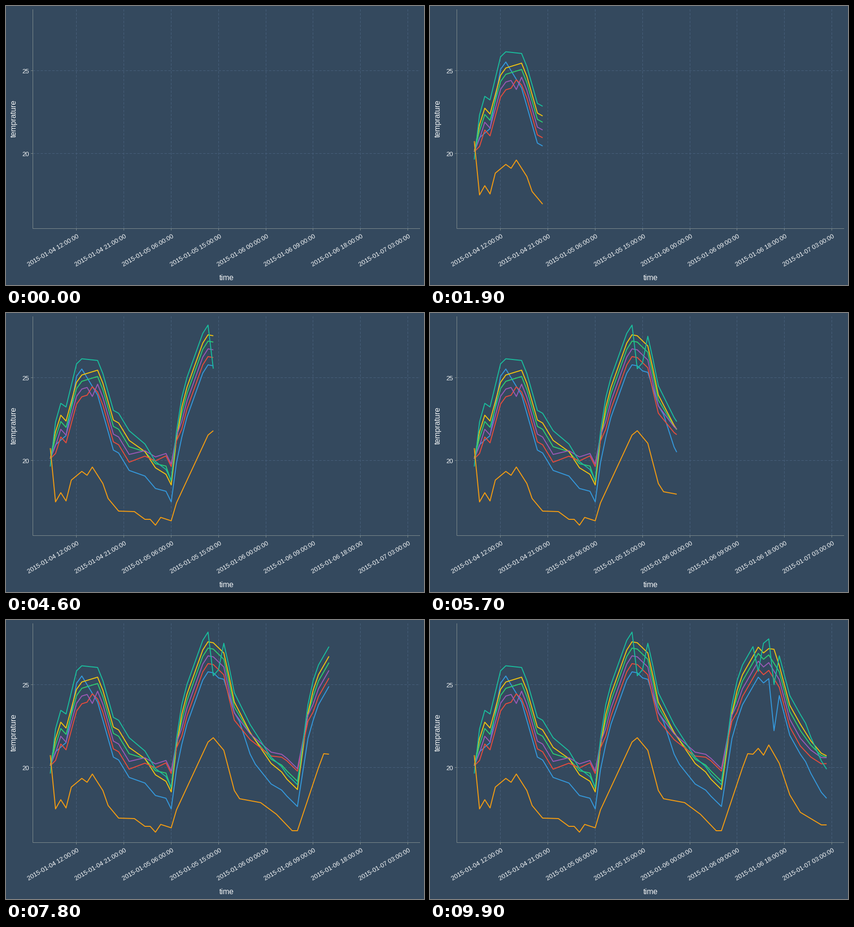
These frames come from a looping animation (864x576 px, 10 s). A matplotlib script:

```python
import numpy as np
import matplotlib.pyplot as plt
from matplotlib.animation import FuncAnimation

W, H, DPI = 864, 576, 72
FRAMES, HOURS = 100, 68
BG, GRID, AXIS, TEXT = "#34495e", "#48607c", "#7f8c8d", "#f4f6f7"
LEFT, RIGHT, TOP, BOTTOM = 55.5, 856, 7, 459.5
X0, HOUR_W = 91.5, 10.87

plt.rcParams["font.family"] = "Liberation Sans"
fig = plt.figure(figsize=(W / DPI, H / DPI), dpi=DPI, facecolor=BG)
ax = fig.add_axes([0, 0, 1, 1])
ax.set_xlim(0, W)
ax.set_ylim(H, 0)
ax.axis("off")


def rule(xs, ys, color, **kw):
    ax.plot(xs, ys, color=color, lw=1, solid_capstyle="butt", snap=False, **kw)


def label(x, y, s, size=13, ha="right", angle=0):
    ax.text(x, y, s, fontsize=size, color=TEXT, ha=ha, va="baseline",
            rotation=angle, rotation_mode="anchor")


# Axes, grid and labels
dashed = dict(ls=(0, (5, 3)), dash_capstyle="butt")
for k in range(8):
    x = int(145.7 + 97.83 * k) + 0.5
    day, hour = divmod(12 + 9 * k, 24)
    rule([x, x], [BOTTOM, TOP], GRID, **dashed)
    rule([x, x], [BOTTOM, BOTTOM + 4], AXIS)
    label(x + 6.4, 477.5, f"2015-01-{4 + day:02d} {hour:02d}:00:00", angle=30)
for temp, y in ((25, 133.5), (20, 304.5)):
    rule([LEFT, RIGHT], [y, y], GRID, **dashed)
    rule([LEFT - 4, LEFT], [y, y], AXIS)
    label(47.5, y + 5.5, str(temp))
rule([LEFT, LEFT], [TOP, BOTTOM], AXIS)
rule([LEFT, RIGHT], [BOTTOM, BOTTOM], AXIS)
label(455.5, 566, "time", 16, "center")
label(20.5, 232.5, "temprature", 16, "center", 90)

hours = np.arange(HOURS)


def through(*points):
    """Hourly heights along straight runs between (hour, y) key points."""
    return np.interp(hours, *zip(*points))


# The three-day swing that six sensors share, and the cooler seventh
indoor = through(
    (0, 301), (2, 233), (3, 245), (5, 165), (6, 150), (9, 140), (10, 167),
    (12, 243), (13, 249), (15, 285), (18, 288), (20, 308), (22, 308),
    (23, 330), (24, 259), (26, 175), (29, 84), (30, 67), (31, 69), (33, 90),
    (35, 187), (38, 237), (42, 284), (44, 293), (47, 325), (49, 198),
    (51, 135), (54, 78), (55, 90), (56, 81), (58, 116), (60, 198), (62, 237),
    (64, 265), (66, 284), (67, 286))
outdoor = through(
    (0, 279), (1, 390), (2, 371), (3, 388), (4, 345), (6, 327), (7, 335),
    (8, 318), (10, 352), (11, 383), (13, 409), (16, 410), (18, 426),
    (19, 426), (20, 438), (21, 422), (23, 429), (24, 392), (30, 252),
    (31, 243), (33, 269), (35, 352), (36, 369), (40, 377), (43, 401),
    (46, 435), (47, 435), (51, 305), (52, 276), (53, 277), (54, 265),
    (55, 279), (56, 258), (58, 296), (60, 361), (62, 397), (66, 423),
    (67, 423))

# How far each night has run towards dawn
dawn = through((15, 0), (22, 1), (23, 1), (25, 0), (34, 0), (45, 1), (47, 1),
               (50, 0), (62, 0), (67, 0.35))
spread = np.minimum(hours, 1)


def sensor(by_day, by_dawn, *bumps):
    """Shared swing, shifted by day and at dawn, plus (hour, width, height) bumps."""
    ys = indoor + spread * (by_day + (by_dawn - by_day) * dawn)
    for hour, width, height in bumps:
        ys = ys + height * np.maximum(0, 1 - abs(hours - hour) / width)
    return ys


series = [
    (sensor(40, 60, (1, 1, -35), (5.5, 4, -85), (35.5, 3, -45), (57, 1, 90),
            (67, 4, 35)), "#3498db"),
    (sensor(-9, 8, (23, 1, 10)), "#2ecc71"),
    (sensor(-22, 25, (57, 1, -16)), "#f1c40f"),
    (sensor(23, -13, (8, 1, -14)), "#e74c3c"),
    (sensor(7, -18, (8, 1, 22)), "#9b59b6"),
    (sensor(-42, 15, (0, 1, 16), (5, 4, -18), (31, 1, 88), (32, 1, 65),
            (54, 1, 70), (57, 1, 77), (67, 4, 44)), "#1abc9c"),
    (outdoor, "#f39c12"),
]
lines = [ax.plot([], [], color=c, lw=2, solid_capstyle="butt",
                 solid_joinstyle="round", zorder=3)[0] for _, c in series]

# Every reading lands on a whole frame; the tip slides linearly between
arrival = np.round(hours * (FRAMES - 1) / (HOURS - 1))


def update(frame):
    tip = np.interp(frame, arrival, hours)
    shown = np.append(hours[hours < tip], tip)
    for line, (ys, _) in zip(lines, series):
        line.set_data(X0 + HOUR_W * shown, np.interp(shown, hours, ys))
    return lines


anim = FuncAnimation(fig, update, frames=FRAMES, interval=100, repeat=True,
                     repeat_delay=0, blit=False)
plt.show()
```
